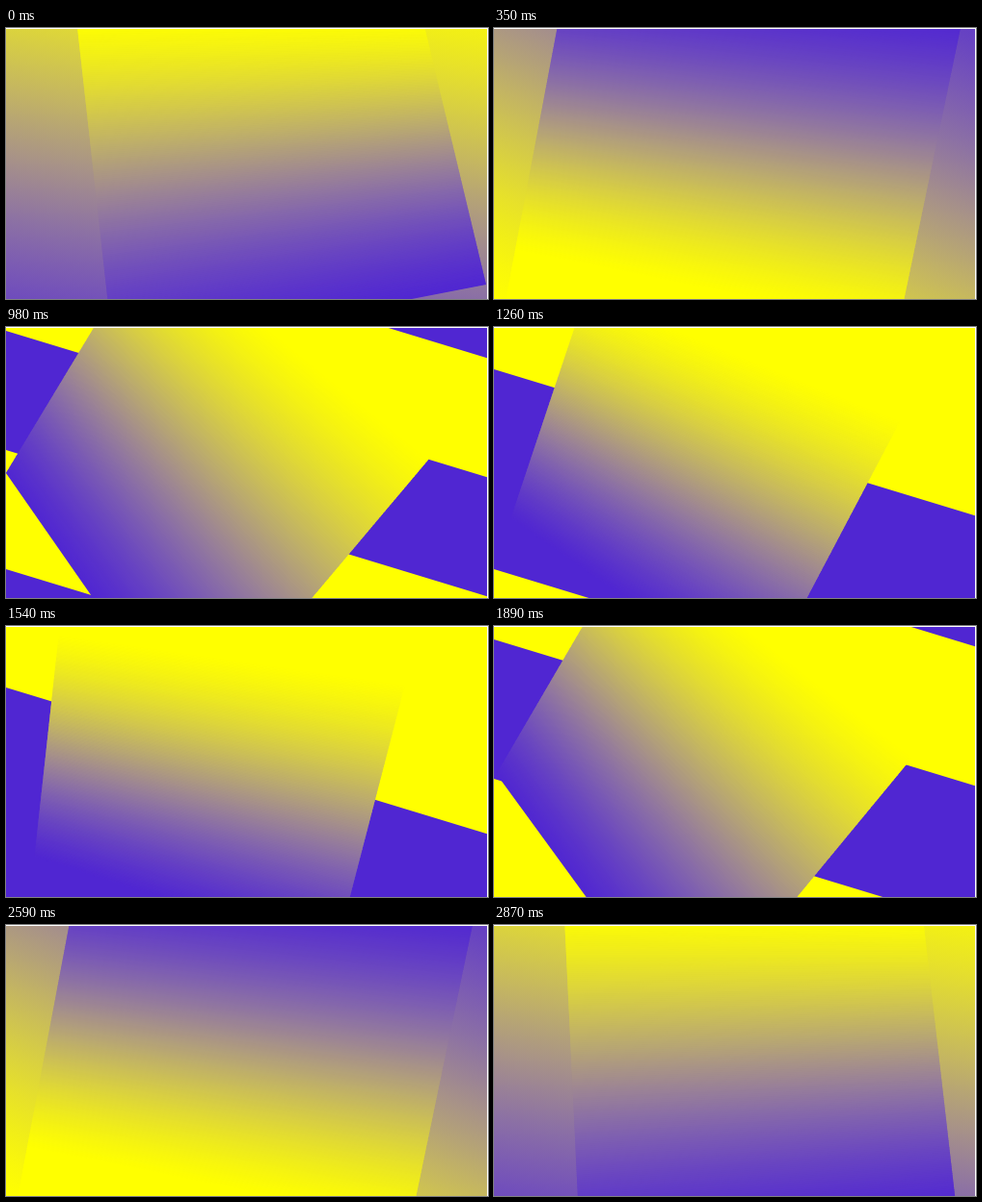
Animation, 500 px wide and 282 px high, one loop 2.94 s. Source, as an HTML page with a canvas:

```html
<!DOCTYPE html>
<html lang="en">
<head>
<meta charset="utf-8">
<title>Tilting gradient</title>
<style>
  html, body { margin: 0; width: 100%; height: 100%; overflow: hidden; background: #fff; }
  canvas { display: block; }
</style>
</head>
<body>
<canvas id="stage" width="500" height="282"></canvas>
<script>
const ctx = document.getElementById('stage').getContext('2d');
const W = 499, H = 282, STEP = 70, STEPS = 42, BANDS = 180;
const FLIP_FROM = 3, FLIP_TO = 8, PEAK = 14;

// The panel swings through four poses: top left, top right, bottom right, bottom left.
const POSES = [
  { at: 0,    corners: [73, -10, 432, -10, 498, 267, 112, 342] },
  { at: 5,    corners: [75, -50, 486, -10, 403, 390, 9, 300] },
  { at: PEAK, corners: [150, -97, 439, 137, 193, 430, 0, 152] },
  { at: 21,   corners: [37, 28, 410, 45, 370, 325, 35, 257] }
];

const lerp = (a, b, u) => a + (b - a) * u;
const clamp = x => Math.min(1, Math.max(0, x));

// Yellow to purple, gently eased, with a little extra blue halfway.
function shade(pos) {
  const p = clamp(pos);
  const e = lerp(p, p * p * (3 - 2 * p), 0.5);
  const blue = 210 * e + 30 * Math.sin(Math.PI * e);
  return `rgb(${Math.round(255 - 175 * e)},${Math.round(255 - 217 * e)},${Math.round(blue)})`;
}

// Smooth curve through the poses.
function panelAt(k) {
  const last = POSES.length - 1;
  let i = 0;
  while (i < last - 1 && k >= POSES[i + 1].at) i++;
  const a = POSES[i], b = POSES[i + 1];
  const span = b.at - a.at, u = (k - a.at) / span;
  const speed = (n, c) => {
    const p = POSES[Math.max(n - 1, 0)], q = POSES[Math.min(n + 1, last)];
    return (q.corners[c] - p.corners[c]) / (q.at - p.at);
  };
  return a.corners.map((from, c) => {
    const ease = u * u * (3 - 2 * u);
    const leave = speed(i, c) * u * (1 - u) * (1 - u);
    const arrive = speed(i + 1, c) * u * u * (1 - u);
    return lerp(from, b.corners[c], ease) + span * (leave - arrive);
  });
}

function fillPolygon(points, color) {
  ctx.fillStyle = color;
  ctx.beginPath();
  points.forEach(([x, y]) => ctx.lineTo(x, y));
  ctx.fill();
}

// Even gradient, given its position at three corners of the stage.
function drawWash(corner, right, bottom) {
  const gx = (right - corner) / W, gy = (bottom - corner) / H;
  const g2 = gx * gx + gy * gy;
  const end = pos => [(pos - corner) * gx / g2, (pos - corner) * gy / g2];
  const gradient = ctx.createLinearGradient(...end(0), ...end(1));
  for (let p = 0; p <= 16; p++) gradient.addColorStop(p / 16, shade(p / 16));
  ctx.fillStyle = gradient;
  ctx.fillRect(0, 0, W, H);
}

// Stripes tilt and rise up to the peak, then sink and widen.
function drawStripes(k) {
  const u = k - PEAK;
  const [sink, tilt, grow] = u < 0 ? [-14, 0.054, 1.4] : [10, 0, 21];
  const top = 4 + sink * u, size = 124 + grow * u;
  const drop = (0.305 + tilt * u) * W;
  ctx.fillStyle = shade(0);
  ctx.fillRect(0, 0, W, H);
  for (let n = -2; n <= 2; n++) {
    const y = top + 2 * n * size;
    fillPolygon([[0, y], [W, y + drop], [W, y + drop + size], [0, y + size]], shade(1));
  }
}

// Bands across the panel, spaced by its foreshortening.
function drawPanel([ax, ay, bx, by, cx, cy, dx, dy], flipped) {
  const depth = Math.hypot(bx - ax, by - ay) / Math.hypot(cx - dx, cy - dy);
  const left = t => [lerp(ax, dx, t), lerp(ay, dy, t)];
  const right = t => [lerp(bx, cx, t), lerp(by, cy, t)];
  for (let i = 0; i < BANDS; i++) {
    const t = i / BANDS, next = Math.min(1, (i + 1.6) / BANDS);
    const pos = t / lerp(depth, 1, t);
    fillPolygon([left(t), right(t), right(next), left(next)], shade(flipped ? 1 - 1.25 * t : pos));
  }
}

function draw(k) {
  const flipped = k >= FLIP_FROM && k < FLIP_TO;
  ctx.fillStyle = '#fff';
  ctx.fillRect(0, 0, 500, H);
  ctx.save();
  ctx.beginPath();
  ctx.rect(0, 1, W, H - 1);
  ctx.clip();
  if (flipped) drawWash(0.48, 0.84, 0);
  else if (k < FLIP_FROM) drawWash(0.25, 0.1, 0.78);
  else drawStripes(k);
  drawPanel(panelAt(k), flipped);
  ctx.restore();
}

let shown = -1;
const start = performance.now();

function tick() {
  const step = Math.floor((performance.now() - start) / STEP) % STEPS;
  if (step !== shown) {
    shown = step;
    draw(Math.min(step, STEPS - step)); // there and back
  }
  requestAnimationFrame(tick);
}
tick();
</script>
</body>
</html>
```
